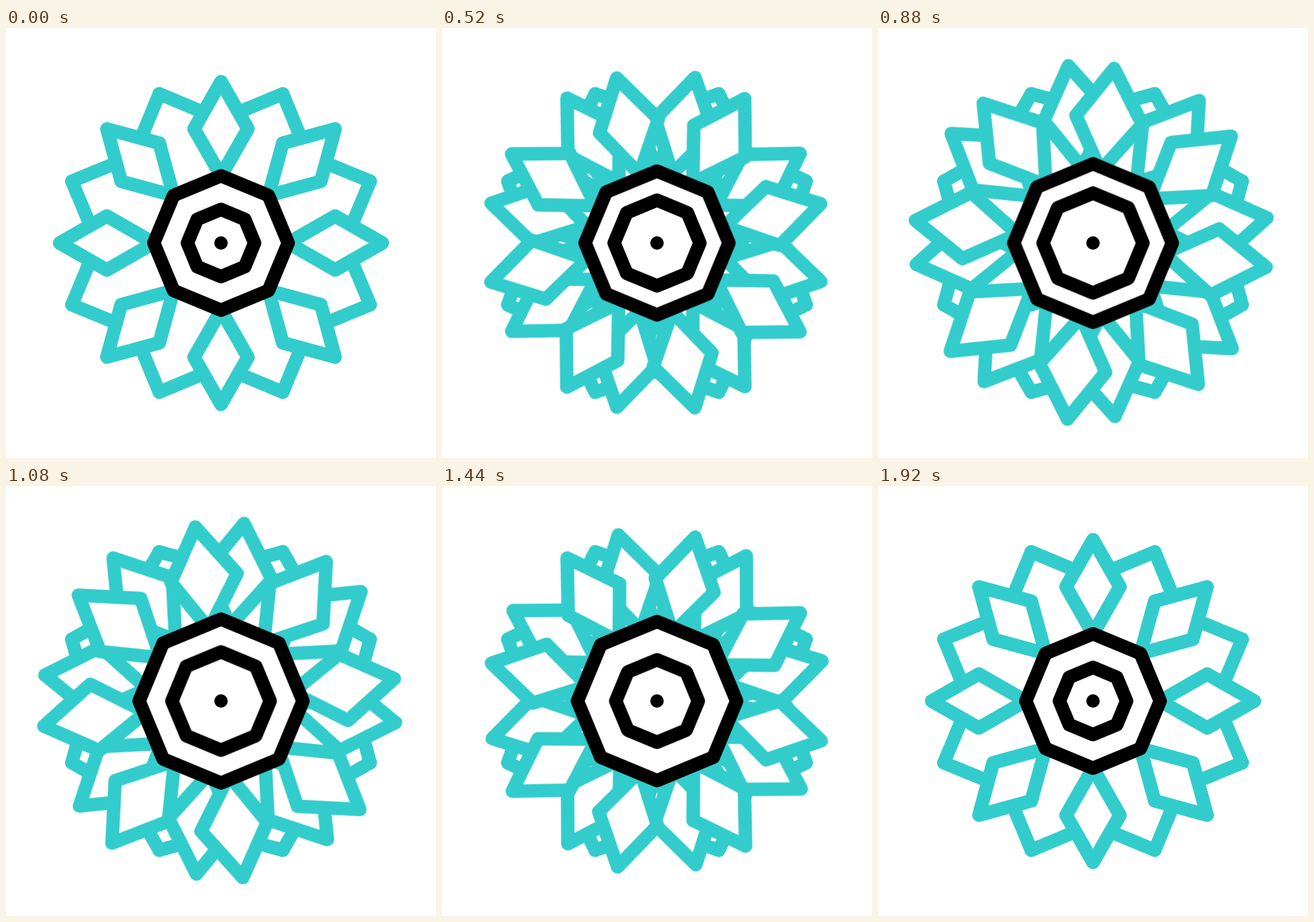
These frames come from a looping animation (640x640 px, 2 s). An HTML page:

```html
<!DOCTYPE html>
<html lang="en">
<head>
<meta charset="utf-8">
<title>Mandala flower</title>
<style>
  html, body { margin: 0; width: 100%; height: 100%; overflow: hidden; background: #fff; }
  svg { display: block; width: 640px; height: 640px; }
  path {
    fill: #fff; stroke: #33cccc; stroke-width: 20;
    stroke-linejoin: round; stroke-linecap: round;
    vector-effect: non-scaling-stroke;
  }
  .black { stroke: #000; }

  /* easeInOutSine between keyframes */
  .turn, .grow, .leaf, .petal, .black {
    animation: 2s cubic-bezier(.37, 0, .63, 1) infinite;
  }
  .turn { --turn: 90deg; animation-name: turn; }
  .front { --turn: -90deg; }
  .grow { transform-origin: 34px 11px; animation-name: grow; }
  .leaf { fill: none; animation-name: leaf; }
  .petal { animation-name: petal; }
  .outer { animation-name: outer; }
  .inner { animation-name: inner; }

  @keyframes turn {
    0%, 2.5% { transform: rotate(0deg); }
    95.5%, 100% { transform: rotate(var(--turn)); }
  }
  @keyframes grow {
    0%, 2.5%, 95.5%, 100% { transform: scale(1); }
    49% { transform: scale(1.1); }
  }
  @keyframes leaf {
    0%, 2.5%, 95.5%, 100% { d: path("M-92 -222L-8 -187L-21 -172L0 -100L21 -172L8 -187L92 -222"); }
    49% { d: path("M-92 -222L-8 -199.5L-21 -172L0 -100L21 -172L8 -199.5L92 -222"); }
  }
  @keyframes petal {
    0%, 2.5%, 95.5%, 100% { d: path("M0 -240L40 -170L0 -100L-40 -170Z"); }
    49% { d: path("M0 -240L48 -170L0 -100L-43 -170Z"); }
  }
  @keyframes outer {
    0%, 4.5%, 96%, 100% { transform: scale(1); }
    62% { transform: scale(1.23); }
  }
  @keyframes inner {
    0%, 2%, 95.5%, 100% { transform: scale(.5); }
    46.5% { transform: scale(.745); }
  }
</style>
</head>
<body>
<svg viewBox="0 0 640 640">
  <g transform="translate(320 320)">
    <g class="ring">
      <path class="leaf" d="M-92 -222L-8 -187L-21 -172L0 -100L21 -172L8 -187L92 -222"/>
    </g>
    <g class="turn"><g class="grow ring">
      <path class="petal" d="M0 -240L40 -170L0 -100L-40 -170Z"/>
    </g></g>
    <g class="turn front"><g class="grow ring">
      <path class="petal" d="M0 -240L40 -170L0 -100L-40 -170Z"/>
    </g></g>
    <path class="black outer" d="M0 -100L70.7 -70.7L100 0L70.7 70.7L0 100L-70.7 70.7L-100 0L-70.7 -70.7Z"/>
    <path class="black inner" d="M0 -100L70.7 -70.7L100 0L70.7 70.7L0 100L-70.7 70.7L-100 0L-70.7 -70.7Z"/>
    <circle r="10"/>
  </g>
</svg>
<script>
  // Repeat each ring's single part around the centre.
  for (const ring of document.querySelectorAll('.ring')) {
    const part = ring.firstElementChild;
    for (let angle = 45; angle < 360; angle += 45) {
      const copy = part.cloneNode();
      copy.setAttribute('transform', `rotate(${angle})`);
      ring.append(copy);
    }
  }
</script>
</body>
</html>
```
